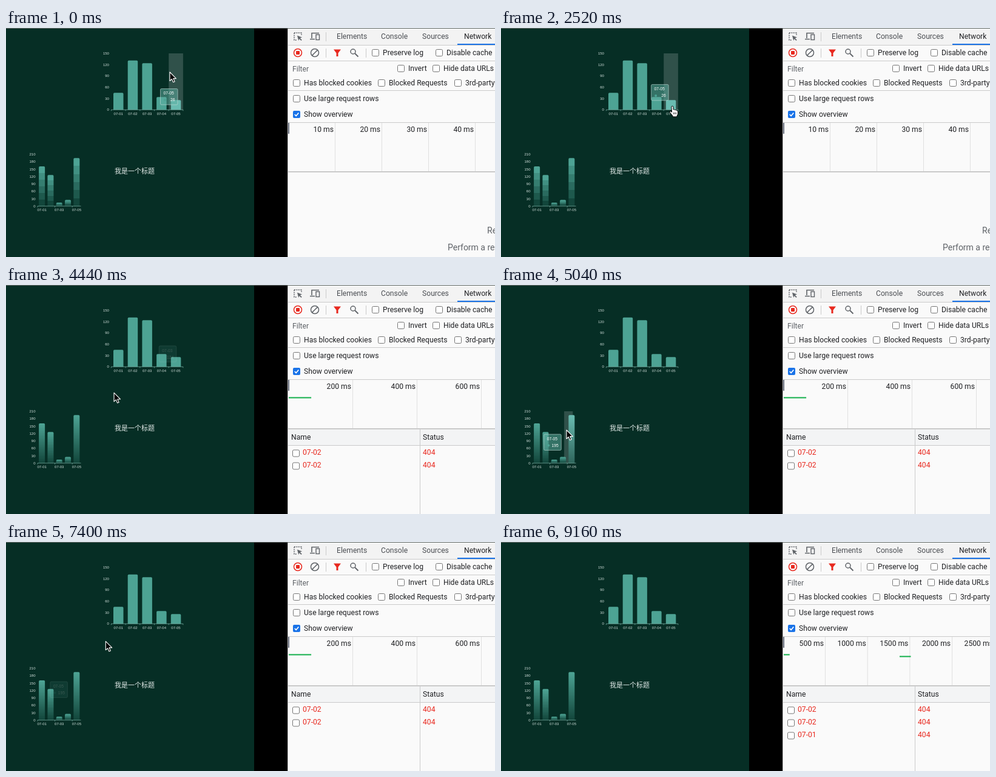
An HTML page for the animation above (9.48 s loop, 806 px wide and 379 px high).

```html
<!DOCTYPE html>
<html lang="zh">
<head>
<meta charset="utf-8">
<title>Charts and network panel</title>
<style>
  html, body { margin: 0; width: 100%; height: 100%; overflow: hidden; background: #000; }
  svg { display: block; width: 806px; height: 379px; }
  text { font: 12.15px Roboto, "Liberation Sans", sans-serif; }
  .tiny text { font: 6px "Liberation Sans", Arial, sans-serif; fill: #d5e2de; }
  .tiny .tip text { font-size: 6.7px; fill: #fff; }
  text.title { font: 11px "Noto Sans CJK SC", "Noto Sans CJK", sans-serif; fill: #e4ebe9; }
  text.hint { font-size: 14px; fill: #5f6368; }
</style>
</head>
<body>
<svg viewBox="0 0 806 379">
  <defs>
    <linearGradient id="smooth" x2="0" y2="1"></linearGradient>
    <linearGradient id="banded" x2="0" y2="1"></linearGradient>
    <linearGradient id="lit" x2="0" y2="1"><stop stop-color="#69bcb1"/><stop offset="1" stop-color="#2f665c"/></linearGradient>
  </defs>
  <g id="back"></g>
  <g id="live"></g>
</svg>
<script>
const LOOP = 9480, FRAMES = 64, STEP = 148.1;
const RED = '#e8291f', GREY = '#5f6368', INK = '#202124', GREEN = '#12b04b', RULE = '#cacaca';
const END = 'text-anchor="end"', MID = 'text-anchor="middle"';

const $ = id => document.getElementById(id);
const rect = (x, y, w, h, fill, more = '') => `<rect x="${x}" y="${y}" width="${w}" height="${h}" fill="${fill}" ${more}/>`;
const ring = (x, y, r, stroke) => `<circle cx="${x}" cy="${y}" r="${r}" fill="none" stroke="${stroke}" stroke-width="1.5"/>`;
const text = (x, y, s, fill = INK, more = '') => `<text x="${x}" y="${y}" fill="${fill}" ${more}>${s}</text>`;
const path = (d, stroke, fill = 'none', width = 1) => `<path d="${d}" stroke="${stroke}" fill="${fill}" stroke-width="${width}"/>`;
const ease = p => p * p * (3 - 2 * p);
const day = i => `07-0${i + 1}`;

const charts = [
  { x: 173.4, slot: 23.7, top: 42, base: 135.3, max: 150, bar: 16.5, every: 1, data: [45, 131, 124, 34, 26] },
  { x: 52, slot: 14.3, top: 209, base: 294.8, max: 210, bar: 10, every: 2, data: [161, 126, 14, 25, 195] }
];
const centre = (c, i) => c.x + c.slot * (i + .5);
const height = (c, v) => v / c.max * (c.base - c.top);

// Each move leaves and arrives at a time and ends at a point
const origin = { x: 270, y: 73 };
const moves = [
  { from: 0, to: 880, x: 350, y: 110 },
  { from: 1190, to: 2370, x: 284, y: 130 },
  { from: 2820, to: 3700, x: 250.5, y: 122.5 },
  { from: 4010, to: 4890, x: 102, y: 237 },
  { from: 4890, to: 5040, x: 108, y: 240 },
  { from: 5780, to: 6510, x: 69, y: 263 },
  { from: 6670, to: 7850, x: 209, y: 118 },
  { from: 8310, to: 9180, x: 747, y: 398 }
];
function cursorAt(k) {
  let { x, y } = origin;
  for (const m of moves) {
    const p = ease(Math.min(1, Math.max(0, (k * STEP - m.from) / (m.to - m.from))));
    x += (m.x - x) * p;
    y += (m.y - y) * p;
  }
  return { x, y };
}

function hit(k) {
  const { x, y } = cursorAt(k);
  for (const c of charts) {
    const i = Math.floor((x + 2 - c.x) / c.slot);
    if (i >= 0 && i < 5 && y >= c.top && y <= c.base) return { c, i };
  }
}

// The tooltip hangs below right of the cursor and flips where it would leave its chart
function tipTarget(k, c) {
  const { x, y } = cursorAt(k);
  return {
    x: x + 38 > c.x + c.slot * 5 ? x - 37 : x + 9,
    y: y + 35 > c.base + 23 ? y - 37 : y + 7.5
  };
}
function simulateTips() {
  const tips = [{ x: 254, y: 100, alpha: 1, ...hit(0) }];
  for (let k = 1; k < FRAMES; k++) {
    const last = tips[k - 1], h = hit(k);
    if (!h) {
      tips.push({ ...last, alpha: Math.max(0, last.alpha - .4) });
      continue;
    }
    const goal = tipTarget(k, h.c), follow = last.alpha && last.c === h.c ? .8 : 1;
    tips.push({ ...h, alpha: 1, x: last.x + (goal.x - last.x) * follow, y: last.y + (goal.y - last.y) * follow });
  }
  return tips;
}
const tips = simulateTips();

function drawChart(c, k) {
  const now = hit(k), before = k ? hit(k - 1) : now;
  const active = now && now.c === c ? now.i : -1;
  let out = '', axis = `M${c.x} ${c.base}h${c.slot * 5}`;
  if (active >= 0) {
    const from = before && before.c === c ? before.i : active;
    out += rect(c.x + c.slot * (from + (active - from) * .64), c.top, c.slot, c.base - c.top, '#fff', 'opacity=".17"');
  }
  c.data.forEach((v, i) => {
    const h = height(c, v), r = Math.min(1.8, h / 3), on = i === active;
    const fill = c === charts[0] ? (on ? '#69bcb1' : '#4da394') : `url(#${on ? 'lit' : k < 30 ? 'banded' : 'smooth'})`;
    out += path(`M${centre(c, i) - c.bar / 2} ${c.base}v${r - h}q0 ${-r} ${r} ${-r}h${c.bar - 2 * r}q${r} 0 ${r} ${r}V${c.base}z`, 'none', fill);
    if (i % c.every === 0) out += text(centre(c, i), c.base + 8.2, day(i), '', MID);
  });
  for (let i = 0; i <= 5; i += c.every) axis += `M${c.x + c.slot * i} ${c.base}v2`;
  for (let v = 0; v <= c.max; v += 30) out += text(c.x - 3.5, c.base + 2 - height(c, v), v, '', END);
  return out + path(axis, '#7fb5aa', 'none', .7);
}

function drawTip(k) {
  const { x, y, alpha, c, i } = tips[k];
  if (!alpha) return '';
  return `<g class="tip" transform="translate(${x} ${y})" opacity="${alpha}">` +
    rect(.5, .5, 28.5, 26.5, '#5fb0a3', 'fill-opacity=".52" stroke="#c5dcd7" stroke-opacity=".75" stroke-width=".8" rx="1.8"') +
    `<circle cx="8" cy="19" r="2" fill="#4da394"/>` +
    text(5.5, 10.3, day(i)) + text(24.5, 21.3, c.data[i], '', END) + '</g>';
}

function drawCursor(k) {
  const { x, y } = cursorAt(k), h = hit(k);
  const onBar = h && Math.abs(x + .5 - centre(h.c, h.i)) <= h.c.bar / 2 + .5 && y >= h.c.base - height(h.c, h.c.data[h.i]);
  const shape = onBar
    ? path('M-3.1 1q0-1.8 1.5-1.8t1.6 1.8v4q2.2-.8 2.7.7q2.1-.7 2.6.8q2.2-.2 2.2 2v3q0 2-1.5 4v1.4h-7v-1.4l-4.4-5.6q-.9-1.8.7-2.2q1-.1 2.2 1.7z', '#000', '#fff') +
      path('M.5 9.7v3m2.1-3v3m2.1-3v3', '#000', 'none', .8)
    : path('M0 0v14.5l3.3-3 2.3 5.3 2.5-1-2.3-5.2h4.6z', '#fff', '#000', 1.1);
  return `<g transform="translate(${x} ${y})" stroke-linejoin="round">${shape}</g>`;
}

const checkbox = (x, y, on) => on
  ? rect(x - 6, y - 6, 12, 12, '#1a73e8', 'rx="2"') + path(`M${x - 3.2} ${y}l2.3 2.5l4.2-5`, '#fff', 'none', 1.7)
  : rect(x - 5.5, y - 5.5, 11, 11, '#fff', 'rx="2" stroke="#767676"');

const requests = [
  { at: 18, done: 20, name: day(1) },
  { at: 27, done: 29, name: day(1) },
  { at: 55, done: 58, name: day(0) }
];
const [first, second, third] = requests.map(r => r.at);

function drawOverview(k) {
  const [unit, start, gap] = k <= second ? [10, 542.5, 77] : k < third ? [200, 571.5, 106] : [500, 534.5, 69.7];
  let out = '';
  for (let i = 0; i < 5; i++) {
    const x = start + gap * i;
    out += rect(x - .5, 157, 1, 80, '#e0e0e0') + text(x - 2.5, 172, `${unit * (i + 1)} ms`, INK, END);
  }
  if (k >= first) {
    const span = 70 / unit * gap, lead = unit === 10 ? 12 : 0;
    out += rect(466 + lead, 185.5, Math.min(340, span), 2, GREEN);
    if (lead) out += path('M466 186.5h12', '#a09a80', 'none', '2" stroke-dasharray="5 1 2 1');
    if (k >= third) out += rect(657, 188.5, 18.5, 2, GREEN);
  }
  return out + rect(465, 157, 2, 18, '#6b7280') + rect(465, 237, 341, 2, RULE);
}

function drawTable(k) {
  if (k < first) return text(793, 340, 'Re', '', 'class="hint"') + text(728, 368, 'Perform a re', '', 'class="hint"');
  let out = rect(465, 239, 341, 26, '#f3f4f5') + rect(465, 265, 341, 1, RULE) + rect(682, 239, 1, 140, RULE) +
    text(470, 256, 'Name') + text(687, 256, 'Status');
  requests.filter(r => k >= r.at).forEach((r, i) => {
    const y = 281 + 21 * i, done = k >= r.done;
    out += checkbox(478, y - 2.5) + text(489, y, r.name, done ? RED : INK) +
      text(687, y, done ? '404' : '(pending)', done ? RED : GREY);
  });
  return out;
}

function drawIcons() {
  return path('M475 8h12v5M475 8v12h5', GREY, 'none', '1.4" stroke-dasharray="2 1.4') +
    path('M480 12.5l8 3-3.3 1.3 3 3-1.2 1.2-3-3-1.3 3z', 'none', GREY) +
    path('M504 17V8.5h12M501 18.5h8', GREY, 'none', 1.6) +
    rect(511, 11, 5.5, 8.5, '#f3f3f3', `stroke="${GREY}" stroke-width="1.4"`) +
    ring(481, 41, 6.5, RED) + rect(478, 38, 6, 6, RED, 'rx="1"') +
    ring(509, 41, 6.5, GREY) + path('M504.6 45.4l8.8-8.8', GREY, 'none', 1.5) +
    path('M540 35.5h12l-4.5 6v5.5h-3v-5.5z', 'none', RED) +
    ring(572, 39, 4, GREY) + path('M575 42l5.5 5.5', GREY, 'none', 1.8);
}

function drawBack() {
  let out = rect(0, 0, 409, 379, '#062e25') + rect(409, 0, 55, 379, '#000') + rect(464, 0, 342, 379, '#fafafa') +
    rect(464, 0, 1, 379, '#bdbdbd') + rect(465, 1, 341, 27, '#f3f3f3');
  for (const y of [28, 54, 103, 156]) out += rect(465, y, 341, 1, RULE);
  for (const [x, y] of [[527, 7], [527, 34], [593, 34]]) out += rect(x, y, 1, 15, RULE);
  out += rect(744, 26, 62, 2, '#1a73e8') + rect(0, 0, 806, 1, '#646b69') + drawIcons();

  const tabs = { Elements: 545, Console: 618, Sources: 686, Network: 755 };
  for (const name in tabs) out += text(tabs[name], 18, name, name === 'Network' ? INK : '#4c4f54');
  out += text(472, 72, 'Filter', GREY);

  const options = [
    [609, 41, 'Preserve log'], [714, 41, 'Disable cache'], [651, 67, 'Invert'], [709, 67, 'Hide data URLs'],
    [479, 91, 'Has blocked cookies'], [619, 91, 'Blocked Requests'], [745, 91, '3rd-party'],
    [479, 117, 'Use large request rows'], [479, 143, 'Show overview', true]
  ];
  for (const [x, y, s, on] of options) out += checkbox(x, y, on) + text(x + 12, y + 4.2, s);
  return out + text(179, 240.7, '我是一个标题', '', 'class="title"');
}

// Hard steps from the light to the dark end of the bars; many steps look smooth
function gradient(steps) {
  const light = [77, 163, 148], dark = [18, 70, 59];
  let out = '';
  for (let i = 0; i < steps; i++) {
    const rgb = light.map((v, n) => Math.round(v + (dark[n] - v) * i / (steps - 1)));
    for (const edge of [i, i + 1]) out += `<stop offset="${edge / steps}" stop-color="rgb(${rgb})"/>`;
  }
  return out;
}

$('smooth').innerHTML = gradient(40);
$('banded').innerHTML = gradient(6);
$('back').innerHTML = drawBack();

let shown = -1;
function render(t) {
  const k = Math.min(FRAMES - 1, Math.floor((t % LOOP + 25) / STEP));
  if (k === shown) return;
  shown = k;
  $('live').innerHTML = drawOverview(k) + drawTable(k) +
    `<g class="tiny">${charts.map(c => drawChart(c, k)).join('')}${drawTip(k)}</g>` + drawCursor(k);
}

const start = performance.now();
function loop() {
  render(performance.now() - start);
  requestAnimationFrame(loop);
}
loop();
</script>
</body>
</html>
```
